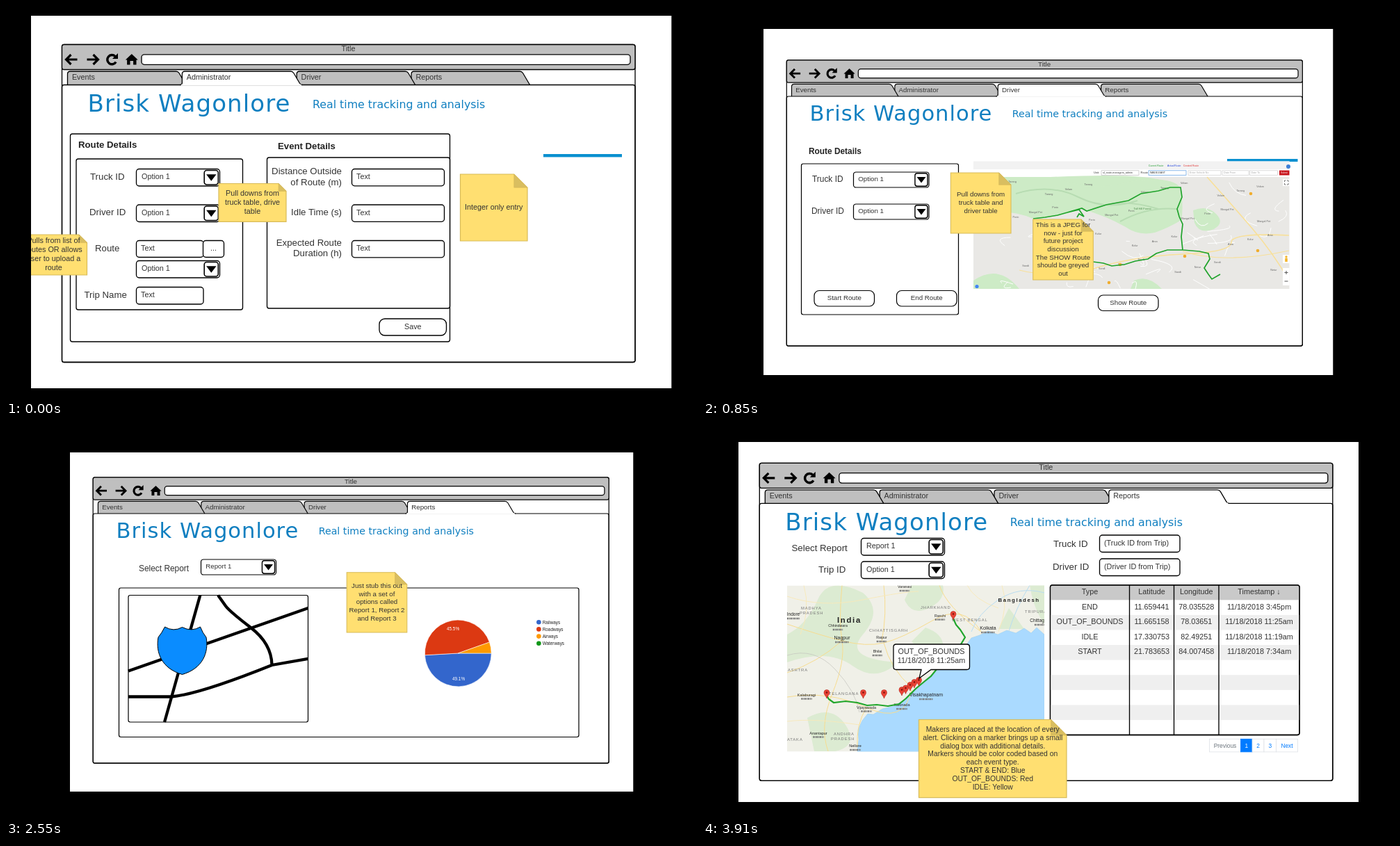
Animation, 994 px wide and 564 px high, one loop 4.25 s. Source, as an HTML page:

```html
<!DOCTYPE html>
<html lang="en">
<head>
<meta charset="utf-8">
<title>Wireframe slides</title>
<style>
html, body { margin: 0; width: 100%; height: 100%; overflow: hidden; background: #000; }
#stage { display: block; width: 994px; height: 564px; font-family: "Liberation Sans", Arial, sans-serif; }
.brand { font-family: "DejaVu Sans", sans-serif; fill: #107fc0; }
</style>
</head>
<body>
<svg id="stage" viewBox="0 0 994 564" xmlns="http://www.w3.org/2000/svg"></svg>
<script>
const HOLD = 850;
const INK = '#333';
let k = 1; // scale of the current slide

const text = (x, y, s, size, o = {}) =>
  `<text x="${x}" y="${y}" font-size="${size}" fill="${o.fill || INK}" text-anchor="${o.at || 'start'}"` +
  `${o.bold ? ' font-weight="bold"' : ''}${o.gap ? ` letter-spacing="${o.gap}"` : ''}>${s}</text>`;
const small = (x, y, s, at) => text(x, y, s, 10.8 * k, { at });
const label = (x, y, s, at) => text(x, y, s, 13.25 * k, { at });
const heading = (x, y, s) => text(x, y, s, 13.2 * k, { bold: true, fill: '#222' });
const path = (d, stroke, w, fill = 'none') =>
  `<path d="${d}" fill="${fill}" stroke="${stroke}" stroke-width="${w}"/>`;
const fillRect = (x, y, w, h, fill) => `<rect x="${x}" y="${y}" width="${w}" height="${h}" fill="${fill}"/>`;
const dot = (x, y, r, fill) => `<circle cx="${x}" cy="${y}" r="${r}" fill="${fill}"/>`;

// Outlined box given by its corners
const box = (x, y, x2, y2, r = 3, fill = '#fff', w = 1.35) =>
  `<rect x="${x}" y="${y}" width="${x2 - x}" height="${y2 - y}" rx="${r * k}" fill="${fill}" stroke="#000" stroke-width="${w * k}"/>`;

const input = (x, y, x2, y2, s) => box(x, y, x2, y2, 4) + small(x + 6.5 * k, (y + y2) / 2 + 2.6 * k, s);

const button = (x, y, x2, y2, s, r = 8) =>
  box(x, y, x2, y2, r) + small((x + x2) / 2, (y + y2) / 2 + 2.8 * k, s, 'middle');

function drop(x, y, x2, y2, s) {
  const bx = x2 - 22.3 * k, cx = x2 - 12.2 * k, cy = (y + y2) / 2;
  return box(x, y, x2, y2, 4) + small(x + 7.5 * k, cy + 2.6 * k, s) +
    box(bx, cy - 10.2 * k, x2 - 2.2 * k, cy + 10.2 * k, 3.5, '#fff', 1.6) +
    `<path d="M${cx - 7.2 * k},${cy - 4.4 * k}h${14.4 * k}l${-7.2 * k},${9.4 * k}z"/>`;
}

function note(x, y, x2, y2, lines, size = 10.8 * k, step = 12.96 * k) {
  const f = 0.2 * Math.min(x2 - x, y2 - y), cx = (x + x2) / 2;
  const base = (y + y2) / 2 + 2.8 * k - (lines.length - 1) / 2 * step;
  return path(`M${x},${y}H${x2 - f}L${x2},${y + f}V${y2}H${x}Z`, '#d8bb58', 1.2 * k, '#ffdf71') +
    path(`M${x2 - f},${y}V${y + f}H${x2}Z`, '#d3b657', 0.6, '#d9be60') +
    lines.map((s, i) => text(cx, base + i * step, s, size, { at: 'middle' })).join('');
}

function table(x, y, x2, y2, cols, rows) {
  const head = 21.3 * k, row = 21.58 * k, edges = [x, ...cols, x2];
  let out = box(x, y, x2, y2) + fillRect(x, y, x2 - x, head, '#c9c9c9');
  for (let top = y + head + row; top < y2; top += 2 * row)
    out += fillRect(x, top, x2 - x, Math.min(row, y2 - top), '#efefef');
  rows.forEach((cells, r) => cells.forEach((s, c) => {
    out += small((edges[c] + edges[c + 1]) / 2, y + 13.1 * k + r * row, s, 'middle');
  }));
  return out + cols.map(c => path(`M${c},${y}V${y2}`, '#000', 1.35 * k)).join('') + box(x, y, x2, y2, 3, 'none');
}

const EVENTS = [
  ['Type', 'Latitude', 'Longitude', 'Timestamp ↓'],
  ['END', '11.659441', '78.035528', '11/18/2018 3:45pm'],
  ['OUT_OF_BOUNDS', '11.665158', '78.03651', '11/18/2018 11:25am'],
  ['IDLE', '17.330753', '82.49251', '11/18/2018 11:19am'],
  ['START', '21.783653', '84.007458', '11/18/2018 7:34am']
];

// Browser window with tabs and page title, drawn at unit scale
function chrome(x, y, active) {
  const s = k;
  k = 1;
  const left = i => 8 + i * 164.85;
  const names = ['Events', 'Administrator', 'Driver', 'Reports'];
  const tab = i => path(`M${left(i)},58v-15.5q0,-4 4,-4h152q3,0 4.5,2.5L${left(i) + 170.5},58`, '#000', 1.3, '#bfbfbf');
  const a = left(active);
  let out = box(0, 0, 824.5, 457) + box(0, 0, 824.5, 36, 3, '#bfbfbf') + small(412, 9.7, 'Title', 'middle') +
    box(114.5, 14.3, 817.5, 28.8, 4) +
    path('M6,21.5H22M13,14.5L6,21.5L13,28.5M36,21.5H52M45,14.5L52,21.5L45,28.5', '#000', 3.2) +
    path('M76.5,17A6.6,6.6 0 1 0 77.6,25', '#000', 3.5) +
    '<path d="M80.5,12.5V20.5H72.5ZM100.3,13.5L109.3,22H107V29H102.6V23.5H98V29H93.6V22H91.3Z"/>';
  for (let i = 3; i >= 0; i--) if (i !== active) out += tab(i);
  out += box(0, 58, 824.5, 457, 3, 'none') +
    path(`M${a - 3},58q3,0 3,-3v-12.5q0,-4 4,-4h152q3,0 4.5,2.5L${a + 169},55.5q1.5,2.5 4,2.5`, '#000', 1.3, '#fff') +
    fillRect(a - 1.5, 57.2, 173, 1.8, '#fff');
  names.forEach((n, i) => { out += small(left(i) + 6.4, 50.8, n); });
  out += `<g class="brand"><text x="37" y="96.5" font-size="34" letter-spacing="1.1">Brisk Wagonlore</text>` +
    `<text x="360.5" y="91" font-size="15.8">Real time tracking and analysis</text></g>`;
  k = s;
  return `<g transform="translate(${x},${y}) scale(${s})">${out}</g>`;
}

const blueBar = (x, y, w, h) => fillRect(x, y, w, h, '#0a90d0');

// White slide that clips its content
const slide = (x, y, x2, y2, body) =>
  `<svg x="${x}" y="${y}" width="${x2 - x}" height="${y2 - y}" viewBox="${x} ${y} ${x2 - x} ${y2 - y}">` +
  fillRect(x, y, x2 - x, y2 - y, '#fff') + body + '</svg>';

function adminSlide() {
  k = 1;
  return slide(36, 14, 957.5, 550, chrome(80.5, 55.5, 1) + blueBar(773, 213, 113, 4.4) +
    box(92.5, 184, 638.5, 483) + box(101, 220, 340.5, 437) + box(375.5, 218, 638.5, 435) +
    heading(104, 203.7, 'Route Details') + heading(391, 206, 'Event Details') +
    label(121, 249.5, 'Truck ID') + label(120, 301, 'Driver ID') +
    label(128, 353, 'Route') + label(112.5, 420, 'Trip Name') +
    drop(187.5, 234.5, 307.5, 259, 'Option 1') + drop(187.5, 286, 307.5, 310.5, 'Option 1') +
    input(187.5, 337.5, 284, 361.5, 'Text') + button(283.5, 337.5, 313.5, 361.5, '...', 4) +
    drop(187.5, 366.5, 307.5, 391, 'Option 1') + input(187.5, 404.5, 284, 429, 'Text') +
    label(483, 242, 'Distance Outside', 'end') + label(483, 257.6, 'of Route (m)', 'end') +
    label(483, 301.3, 'Idle Time (s)', 'end') +
    label(483, 344.6, 'Expected Route', 'end') + label(483, 360.2, 'Duration (h)', 'end') +
    [234.5, 286, 337.5].map(y => input(497.5, y, 630.5, y + 24.3, 'Text')).join('') +
    button(537, 450, 633.5, 474, 'Save') +
    note(306, 255.5, 403, 310.3, ['Pull downs from', 'truck table, drive', 'table']) +
    note(20.5, 329, 116.5, 387, ['Pulls from list of', 'routes OR allows', 'user to upload a', 'route']) +
    note(653.5, 242, 750, 338, ['Integer only entry']));
}

function routeMap() {
  let seed = 7;
  const rnd = () => (seed = seed * 16807 % 2147483647) / 2147483647;
  let out = fillRect(389, 223.5, 454.5, 183.5, '#fff') + fillRect(389, 223.5, 454.5, 11.5, '#f2f2f2') +
    text(641, 230.5, 'Current Route', 3.4, { fill: '#1a9a2a' }) + text(668, 230.5, 'Actual Route', 3.4, { fill: '#2244dd' }) +
    text(691, 230.5, 'Created Route', 3.4, { fill: '#e03030' }) + dot(842, 231, 3, '#3d7fd6') +
    text(562, 241.2, 'Unit:', 4) + text(629.5, 241.2, 'Route', 4);
  for (const [x, w, s, c] of [[573, 54, 'sl_route-managers_admin', '#bbb'], [641, 54, 'WAGE-EAST', '#5b9be0'],
    [698, 47, 'Enter Vehicle No', '#ccc'], [747, 38, 'Date From', '#ccc'], [786.5, 40, 'Date To', '#ccc']])
    out += `<rect x="${x}" y="236.8" width="${w}" height="6.5" fill="#fff" stroke="${c}" stroke-width=".7"/>` +
      text(x + 2, 241.4, s, 3.7, { fill: c === '#ccc' ? '#aaa' : INK });
  out += fillRect(829, 236.5, 14.5, 7, '#c8141c') + text(836, 241.3, 'Submit', 3.2, { fill: '#fff', at: 'middle' });

  let map = fillRect(389, 246, 454.5, 161, '#e9e8e5') +
    path('M389,246H618Q640,248 660,250T686,261Q692,285 688,308Q672,318 650,326Q626,331 608,318Q580,302 545,292Q510,305 475,306Q440,290 389,300Z', 'none', 0, '#cdebc6') +
    path('M500,246Q560,266 600,256T665,253Q640,240 500,246ZM705,294Q725,286 738,299T735,321Q714,329 707,312ZM389,395Q425,370 455,407H389ZM620,395Q640,386 660,407H615Z', 'none', 0, '#cdebc6') +
    path('M450,270Q500,255 540,275T625,280M560,292Q600,275 655,292M600,310Q640,288 682,292', '#b7dcb2', 2);
  for (let i = 0; i < 34; i++) {
    const x = 430 + rnd() * 400, y = 325 + rnd() * 80 - (x > 690 ? rnd() * 75 : 0);
    map += path(`M${x},${y}q${rnd() * 40 - 20},${rnd() * 24 - 12} ${rnd() * 70 - 35},${rnd() * 44 - 22}`, '#fff', 1);
  }
  map += path('M561,378Q620,360 690,357T760,340T843,330M725,246Q760,285 790,320T843,395', '#f8e09a', 1.6) +
    path('M690,353Q750,372 843,352M455,380Q500,392 560,376', '#f8e09a', 1.2);
  const towns = ['Tarang', 'Perin', 'Kolur', 'Sandi', 'Velam', 'Mangal Pet', 'Arsa', 'Netur'];
  for (let i = 0; i < 40; i++) {
    const x = 445 + (i * 61.8) % 385, y = 254 + (i * 37.3) % 147;
    map += text(x, y, towns[i % towns.length], 3.8, { fill: '#666', at: 'middle' });
  }
  map += [[600, 372], [788, 270], [798, 352], [693, 360], [584, 398]].map(p => dot(...p, 2.3, '#f0ad2e')).join('') +
    text(632, 293, 'Tall Hill Forest', 4, { fill: '#4a8a4a', at: 'middle' }) +
    path('M475,306L492,304L510,301L524,297L541,293L548,303L541,299L538,304M524,297L545,291L552,295L580,286L612,280L630,270L655,266L672,261L687,261L689,275L682,292L685,303L690,314L688,332L690,351L668,351L652,356L640,364L622,367L606,372L588,374L576,370L561,368M690,351L714,353L727,356L729,364L721,377L727,386L732,393L744,386', '#1fa32b', 1.7) +
    `<rect x="834" y="249" width="9.5" height="10" fill="#fff"/>` +
    path('M836.5,253v-2h2M840,251h2v2M842,255v2h-2M838.5,257h-2v-2', '#555', 0.8) +
    fillRect(834, 358, 9.5, 12, '#fff') + dot(839, 361, 1.7, '#f3b52c') + fillRect(837.2, 363, 3.6, 5, '#f3b52c') +
    fillRect(834, 377, 9.5, 25, '#fff') + path('M836.5,383.5h5M839,381v5M836.5,396h5', '#555', 1) +
    dot(394, 403.5, 2.6, '#4285f4');
  return out + map;
}

function driverSlide() {
  k = 0.9;
  return slide(87, 33, 906.5, 531, chrome(120.3, 77.8, 2) + blueBar(754, 220, 101.5, 4) + routeMap() +
    heading(152, 213.2, 'Route Details') + box(141.5, 227, 367.5, 444) +
    label(157, 252.7, 'Truck ID') + label(156, 299.2, 'Driver ID') +
    drop(216.5, 239, 325, 261, 'Option 1') + drop(216.5, 285, 325, 307, 'Option 1') +
    button(160, 409.5, 246.5, 432, 'Start Route') + button(278.5, 409.5, 365, 432, 'End Route') +
    button(568.5, 416, 655, 438.5, 'Show Route') +
    note(356.3, 240, 443, 327, ['Pull downs from', 'truck table and', 'driver table']) +
    note(474.7, 307, 561.3, 394, ['This is a JPEG for', 'now - just for', 'future project', 'discussion', 'The SHOW Route', 'should be greyed', 'out']));
}

function eventsSlide() {
  k = 1.098;
  const ids = EVENTS.map((r, i) => [...(i ? ['V08_140618', 'D05_123'] : ['Truck ID', 'Driver ID']), ...r]);
  return slide(0, 0, 994, 564, chrome(42.3, 29.8, 0) + blueBar(803.5, 203, 123.5, 5) +
    drop(245.5, 156, 410, 183, 'Event Type Filter') +
    table(55, 194, 761, 516, [164.5, 245.5, 409.5, 502, 594.5], ids) +
    note(803.3, 249.7, 909, 355, ['Pulls from the', 'events table']));
}

function pie(cx, cy, r, parts) {
  let a = 0;
  const at = t => `${cx + r * Math.cos(t * 2 * Math.PI)},${cy + r * Math.sin(t * 2 * Math.PI)}`;
  return parts.map(([share, fill]) => {
    const from = a;
    a += share;
    return path(`M${cx},${cy}L${at(from)}A${r},${r} 0 0 1 ${at(a)}Z`, '#fff', 0.6, fill);
  }).join('');
}

function reportSlide() {
  k = 0.9;
  const legend = [['Railways', '#3366cc'], ['Roadways', '#dc3912'], ['Airways', '#ff9900'], ['Waterways', '#109618']];
  return slide(92, 38, 902.5, 526, chrome(125.2, 73.8, 3) +
    label(191, 208.5, 'Select Report') + drop(280.5, 192, 388.5, 214, 'Report 1') +
    box(162.5, 233, 824, 447.5) + box(176, 243.5, 434.5, 426) +
    path('M279.3,243.5L228,426M176,352.5L434.5,262M305,243.5L316,259Q322,267 352,290Q382,313 382.5,344M176,389.5H238Q278,386 382.5,344L434.5,334.8', '#000', 4.3) +
    path('M228.5,289Q241,296.5 253.5,289.5Q267,296.5 279.5,289Q283,298 288,304C292,326 283,349 253.5,357.5C224,349 215,326 219,304Q224,298 228.5,289Z', '#000', 1, '#0a8cff') +
    pie(650.3, 327, 47.9, [[0.491, '#3366cc'], [0.455, '#dc3912'], [0.054, '#ff9900']]) +
    text(643, 294.3, '45.5%', 6.4, { fill: '#fff', at: 'middle' }) + text(651, 366.3, '49.1%', 6.4, { fill: '#fff', at: 'middle' }) +
    legend.map(([s, c], i) => dot(766.4, 282.2 + i * 10.2, 3.3, c) + text(771.7, 284.5 + i * 10.2, s, 6.4, { fill: '#222' })).join('') +
    note(490.2, 210.7, 576.8, 297, ['Just stub this out', 'with a set of', 'options called', 'Report 1, Report 2', 'and Report 3']));
}

const pin = (x, y) =>
  path(`M${x},${y + 7}C${x - 1},${y + 3} ${x - 4},${y + 2} ${x - 4},${y - 1.5}a4,4 0 0 1 8,0C${x + 4},${y + 2} ${x + 1},${y + 3} ${x},${y + 7}Z`, '#b3261e', 0.6, '#ea4335') +
  dot(x, y - 1.5, 1.4, '#8c1a12');

function alertMap() {
  let out = fillRect(121, 229.5, 370, 239, '#f0f0e8') +
    path('M121,300Q150,285 165,250T230,240Q260,265 230,300T280,340Q250,370 215,345T121,340ZM300,229H345Q350,250 325,262T290,250ZM320,290Q350,300 345,325T300,310ZM440,262Q450,275 462,292H425ZM470,229H491V285Q475,262 470,229ZM150,420Q185,400 205,430T190,468H160Z', 'none', 0, '#dcebd2') +
    path('M491,300L480,290L472,298L462,291L450,298L437,294L424,300L410,295L398,301L386,305L378,316L368,330L350,343L333,354L318,367L302,381L290,394L274,403L258,407L245,415L237,414L229,424L223,437L224,452L222,468.5H491Z', '#9ccfee', 0.6, '#aadaff');
  const roads = 'M121,285Q165,300 200,309T260,312T330,280T400,296M200,229Q195,280 200,309T186,385T180,468M121,390Q180,380 235,405T300,380M260,312Q270,350 300,376M340,229Q350,260 400,296M200,309Q165,340 121,355M235,405Q220,430 222,462M260,229Q265,270 257,310';
  out += path(roads, '#f7dc8f', 1) + path('M121,245Q170,262 230,250T310,238M145,229Q155,265 140,300M430,229Q440,260 425,296M380,229Q390,250 425,262M121,425Q160,420 225,430', '#f9e9b8', 0.9) +
    path('M386,296Q395,270 425,250T491,240M440,295Q450,262 470,229', '#b8dcf0', 1) +
    path('M121,330Q160,318 190,350T225,412', '#c3c3bd', 0.7);

  const regions = [['MADHYA', 141, 264], ['PRADESH', 139, 271], ['JHARKHAND', 313, 262.5], ['WEST BENGAL', 358, 280.5],
    ['CHHATTISGARH', 239, 296], ['TELANGANA', 181, 387], ['ANDHRA', 188, 445], ['PRADESH', 184, 452],
    ['ASHTRA', 122, 353], ['ATAKA', 121, 452.5], ['TRIPURA', 463, 269]];
  const towns = [['Kolkata', 410, 293, 7], ['Nagpur', 200, 307, 7], ['Visakhapatnam', 321, 389, 7], ['Raipur', 257, 306, 5.2],
    ['Bhilai', 251, 326, 5.2], ['Ranchi', 341, 274.5, 5.2], ['Varanasi', 290, 233, 5.2], ['Chhindwara', 194, 289, 5.2],
    ['Kakinada', 286, 403, 5.5], ['Vijayawada', 235, 406.5, 5.5], ['Kalaburagi', 149, 388.5, 5.5],
    ['Anantapur', 166, 443.5, 5.5], ['Nellore', 219, 462, 5.5], ['Indore', 130, 273, 6.5], ['Chittagong', 486, 282, 6.5]];
  out += regions.map(([s, x, y]) => text(x, y, s, 5.8, { fill: '#777', gap: 0.9 })).join('');
  out += towns.map(([s, x, y, size]) => text(x, y, s, size, { at: 'middle', fill: '#222' }) +
    `<path d="M${x - size * 1.4},${y + 4}h${size * 2.8}" stroke="#777" stroke-width="2.4" stroke-dasharray="2.2 .8 1.2 .6"/>`).join('');
  out += text(193, 282.5, 'India', 11.3, { bold: true, fill: '#222', gap: 1.7 }) +
    text(424.5, 253, 'Bangladesh', 7.8, { bold: true, fill: '#222', gap: 1.6 });
  out += path('M360,277L364,286L370,293L377,304L371,314L362,325L352,336L336,350L328,360L318,368L306,378L292,392L282,400L266,403L250,401L236,402L222,398L205,396L188,398L181,393L178,388', '#21a62c', 2.2);
  out += [[360, 272], [178, 385], [230.5, 385], [260.5, 385], [286, 381], [291.5, 378.5], [298, 374], [304, 370], [310.5, 367]].map(p => pin(...p)).join('');
  return `<svg x="121" y="229.5" width="370" height="239" viewBox="121 229.5 370 239">${out}</svg>` +
    path('M278,314H379.5q4,0 4,4V346.500q0,4 -4,4H328L311,363L314,350.500H278q-4,0 -4,-4V318q0,-4 4,-4Z', '#000', 1.3, '#fff') +
    small(328.5, 328, 'OUT_OF_BOUNDS', 'middle') + small(328.5, 341, '11/18/2018 11:25am', 'middle');
}

function pager() {
  const items = [['Previous', 728.5, 773.5], ['1', 773.5, 790], ['2', 790, 807], ['3', 807, 824.5], ['Next', 824.5, 855.5]];
  return items.map(([s, x, x2], i) =>
    `<rect x="${x}" y="450.3" width="${x2 - x}" height="18.600" fill="${i === 1 ? '#007bff' : '#fff'}" stroke="${i === 1 ? '#007bff' : '#dee2e6'}" stroke-width=".8"/>` +
    text((x + x2) / 2, 462.8, s, 8.4, { at: 'middle', fill: ['#6c757d', '#fff'][i] || '#007bff' })).join('');
}

function tripSlide() {
  k = 1;
  return slide(51, 23, 943, 541, chrome(81.3, 53.3, 3) +
    label(127.5, 179.5, 'Select Report') + drop(227.5, 161.5, 347.5, 186, 'Report 1') +
    label(166, 210.7, 'Trip ID') + drop(227.5, 195, 347.5, 219.5, 'Option 1') +
    label(504, 173.7, 'Truck ID') + input(570.5, 157, 686, 181.500, '(Truck ID from Trip)') +
    label(503, 206.7, 'Driver ID') + input(570.5, 191, 686, 215.5, '(Driver ID from Trip)') +
    alertMap() + table(499.5, 229, 858, 444.5, [613.5, 677.5, 742], EVENTS) + pager() +
    note(310.5, 422.5, 523, 534.7, ['Makers are placed at the location of every', 'alert. Clicking on a marker brings up a small',
      'dialog box with additional details.', 'Markers should be color coded based on', 'each event type.',
      'START &amp; END: Blue', 'OUT_OF_BOUNDS: Red', 'IDLE: Yellow'], 10.35, 11.86));
}

const stage = document.getElementById('stage');
stage.innerHTML = [adminSlide, driverSlide, eventsSlide, reportSlide, tripSlide]
  .map(make => `<g display="none">${make()}</g>`).join('');
const slides = [...stage.children];
const start = performance.now();

function show(t) {
  const now = Math.floor(Math.max(0, t) / HOLD) % slides.length;
  slides.forEach((g, i) => g.setAttribute('display', i === now ? 'inline' : 'none'));
}

function tick() {
  show(performance.now() - start);
  requestAnimationFrame(tick);
}
tick();
</script>
</body>
</html>
```
